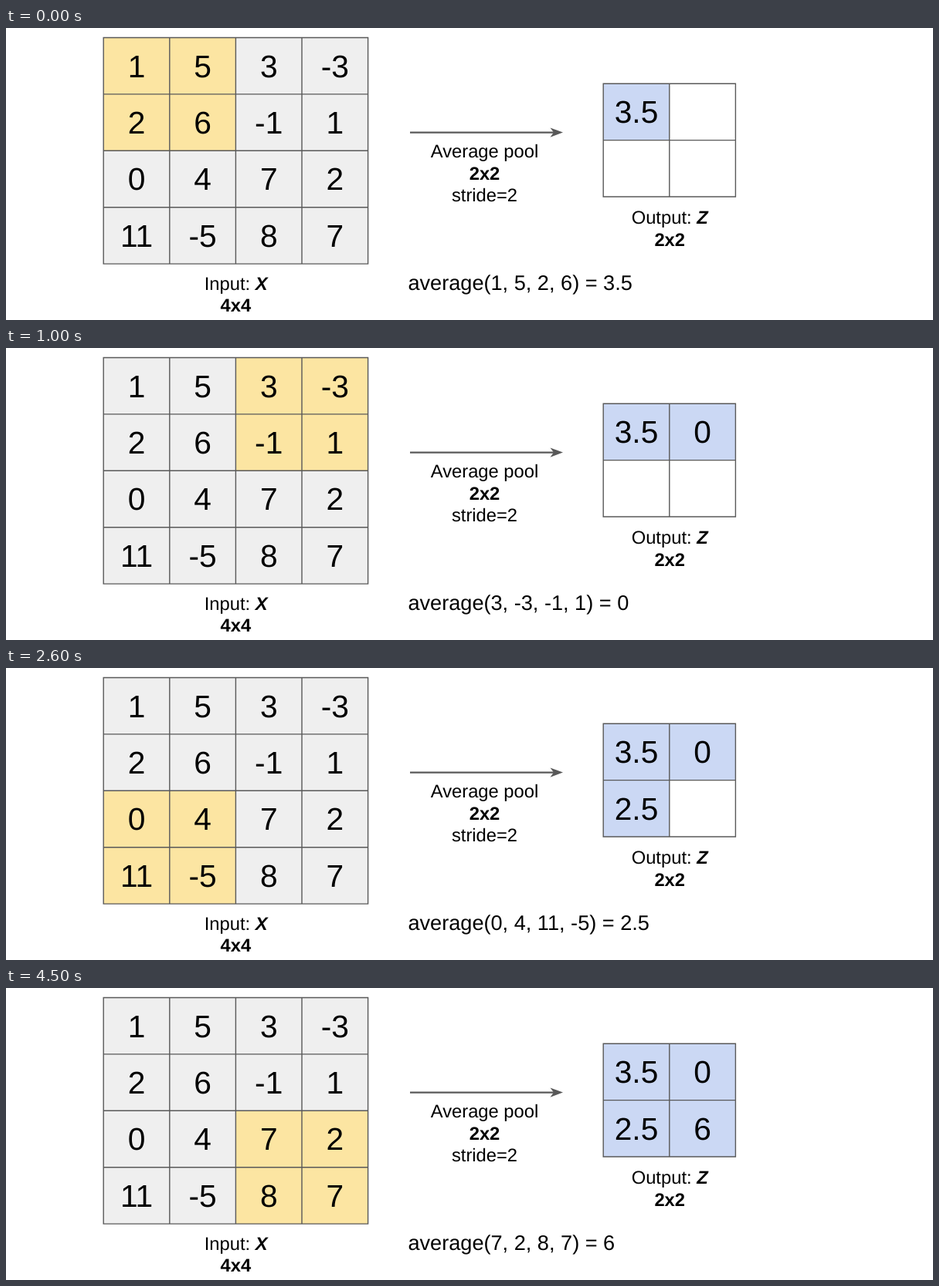
An HTML page for the animation above (5500 ms loop, 1200 by 379 pixels).

```html
<!DOCTYPE html>
<html lang="en">
<head>
<meta charset="utf-8">
<title>Average pooling</title>
<style>
  html, body { margin: 0; width: 100%; height: 100%; overflow: hidden; background: #fff; }
  svg { display: block; width: 1200px; height: 379px; }
  text { font-family: "Liberation Sans", Arial, sans-serif; fill: #000; text-rendering: geometricPrecision; }
  .num { font-size: 40.7px; text-anchor: middle; }
  .label { font-size: 23.75px; text-anchor: middle; }
  .sum { font-size: 27.15px; }
  .bold { font-weight: bold; }
  .ital { font-weight: bold; font-style: italic; }
  .grid { fill: none; stroke: #595959; stroke-width: 1.4; }
</style>
</head>
<body>
<svg id="stage" viewBox="0 0 1200 379">
  <path d="M523 135.6H710" stroke="#595959" stroke-width="2.2"/>
  <path d="M721 135.6L704.5 129.4L709 135.6L704.5 141.8Z" fill="#595959"/>
  <text class="label" x="619.5" y="168.3">Average pool</text>
  <text class="label bold" x="619.5" y="196.9">2x2</text>
  <text class="label" x="619.5" y="225.3">stride=2</text>
  <text class="label" x="859.2" y="254.2">Output: <tspan class="ital">Z</tspan></text>
  <text class="label bold" x="859.2" y="282.8">2x2</text>
  <text class="label" x="297.6" y="340">Input: <tspan class="ital">X</tspan></text>
  <text class="label bold" x="297.4" y="368.4">4x4</text>
  <text class="sum" id="sum" x="520.4" y="339.5"></text>
</svg>
<script>
const INPUT = [[1, 5, 3, -3], [2, 6, -1, 1], [0, 4, 7, 2], [11, -5, 8, 7]];
const STARTS = [0, 1000, 2000, 3000];
const LOOP = 5500;
const CELL_W = 85.6, CELL_H = 73.4;
const GRAY = '#efefef', YELLOW = '#fce5a2', BLUE = '#cbd8f4', WHITE = '#ffffff';

const stage = document.getElementById('stage');
const sum = document.getElementById('sum');

function add(tag, attrs, text = '') {
  const el = document.createElementNS('http://www.w3.org/2000/svg', tag);
  for (const key in attrs) el.setAttribute(key, attrs[key]);
  el.textContent = text;
  stage.append(el);
  return el;
}

function makeGrid(left, top, rows) {
  const n = rows.length;
  const boxes = rows.flatMap((row, r) => row.map((_, c) => add('rect', {
    x: left + c * CELL_W, y: top + r * CELL_H, width: CELL_W, height: CELL_H
  })));
  let lines = '';
  for (let i = 0; i <= n; i++) {
    lines += `M${left + i * CELL_W} ${top - 0.7}v${n * CELL_H + 1.4}`;
    lines += `M${left - 0.7} ${top + i * CELL_H}h${n * CELL_W + 1.4}`;
  }
  add('path', { d: lines, class: 'grid' });
  const texts = rows.flatMap((row, r) => row.map((value, c) => add('text', {
    class: 'num', x: left + (c + 0.5) * CELL_W, y: top + (r + 0.5) * CELL_H + 14.4
  }, value)));
  return { boxes, texts };
}

// The four values under the 2x2 window at each step
const windows = STARTS.map((_, s) => {
  const r = 2 * (s >> 1), c = 2 * (s % 2);
  return [...INPUT[r].slice(c, c + 2), ...INPUT[r + 1].slice(c, c + 2)];
});
const means = windows.map(w => w.reduce((a, b) => a + b) / 4);

const input = makeGrid(126.2, 12.5, INPUT);
const output = makeGrid(773.2, 72.2, [means.slice(0, 2), means.slice(2)]);

function show(step) {
  input.boxes.forEach((box, i) => {
    const block = 2 * (i >> 3) + ((i % 4) >> 1);
    box.setAttribute('fill', block === step ? YELLOW : GRAY);
  });
  output.boxes.forEach((box, i) => {
    box.setAttribute('fill', i <= step ? BLUE : WHITE);
    output.texts[i].setAttribute('visibility', i <= step ? 'visible' : 'hidden');
  });
  sum.textContent = `average(${windows[step].join(', ')}) = ${means[step]}`;
}

let current = -1;
const begin = performance.now();
function tick() {
  const t = (performance.now() - begin) % LOOP;
  const step = STARTS.filter(s => s <= t).length - 1;
  if (step !== current) show(current = step);
  requestAnimationFrame(tick);
}
tick();
</script>
</body>
</html>
```
